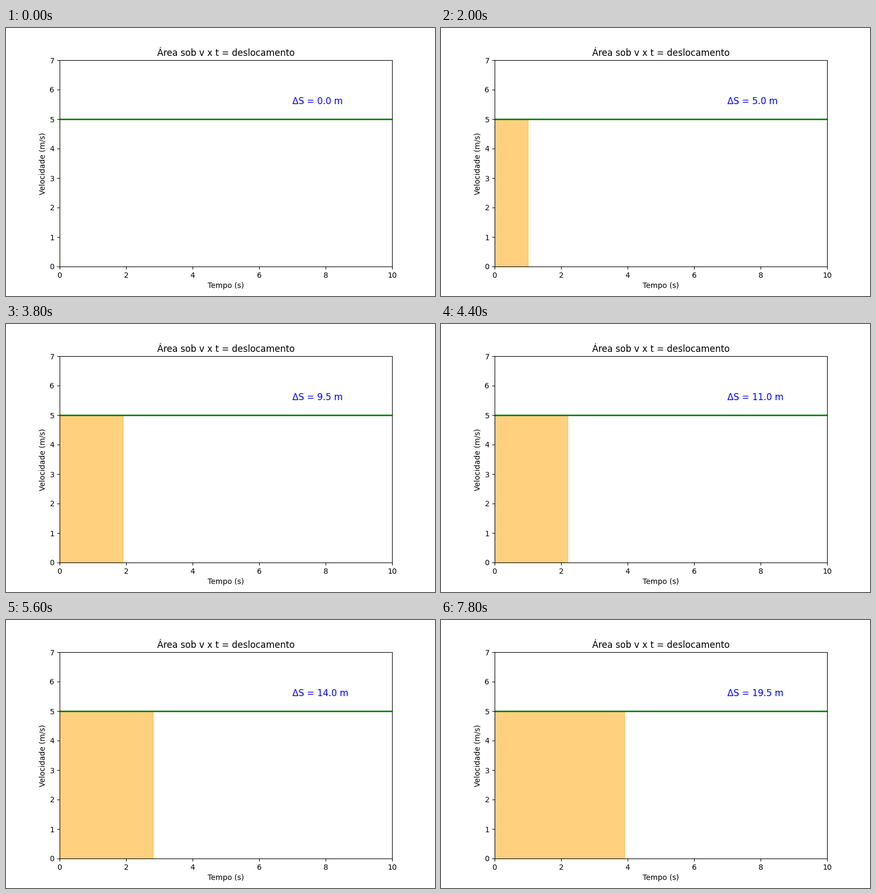
Write a matplotlib script that moves like this. It is 800x500 px and loops after 8000 ms.

```python
import numpy as np
import matplotlib.pyplot as plt
from matplotlib.animation import FuncAnimation

SPEED = 5      # m/s
STEP = 0.1     # simulated seconds per frame
FRAMES = 40

fig, ax = plt.subplots(figsize=(8, 5), dpi=100)
ax.set_xlim(0, 10)
ax.set_ylim(0, 7)
ax.set_title("Área sob v x t = deslocamento")
ax.set_xlabel("Tempo (s)")
ax.set_ylabel("Velocidade (m/s)")

times = np.linspace(0, 10, 101)
ax.plot(times, np.full_like(times, SPEED), color="green", linewidth=2)
label = ax.text(7, 5.5, "", fontsize=12, color="blue")
areas = []


def update(i):
    while areas:
        areas.pop().remove()
    t = i * STEP
    areas.append(ax.fill_between([0, t], 0, SPEED, color="orange", alpha=0.5))
    label.set_text(f"ΔS = {SPEED * t:.1f} m")
    return areas + [label]


anim = FuncAnimation(fig, update, frames=FRAMES, init_func=lambda: update(0),
                     interval=200, repeat=True, repeat_delay=0)
plt.show()
```
